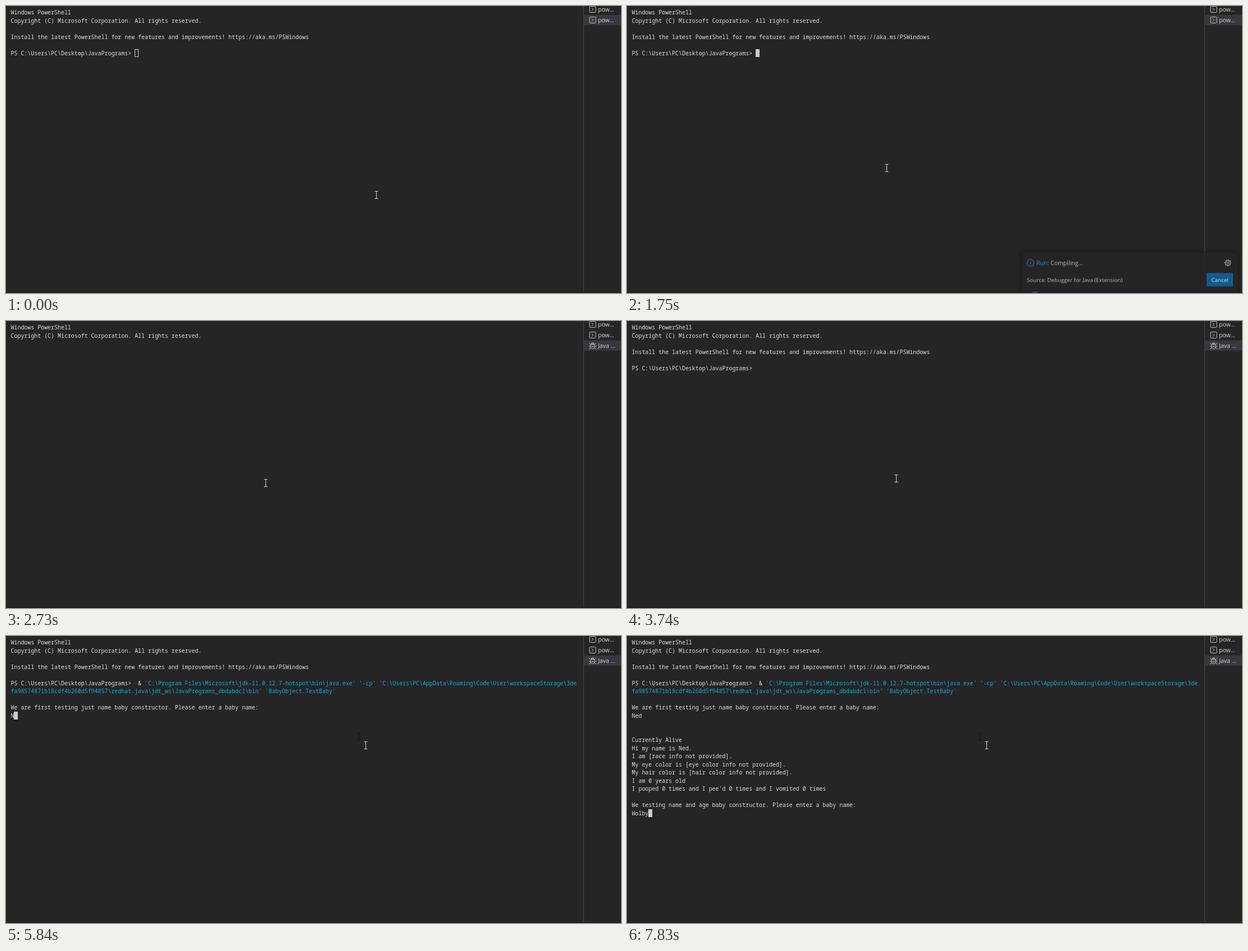
An HTML page for the animation above (8 s loop, 1095 by 512 pixels).

```html
<!DOCTYPE html>
<html lang="en">
<head>
<meta charset="utf-8">
<title>Terminal session</title>
<style>
  html, body { margin: 0; width: 100%; height: 100%; overflow: hidden; background: #252526; }
  .stage { position: relative; width: 1095px; height: 512px; overflow: hidden; }
  svg { position: absolute; inset: 0; }

  /* Every timeline is one 8 s loop that jumps between its keyframes. */
  .anim { animation: 8s step-end infinite; }

  .line, .typed {
    position: absolute; left: 8.5px; top: calc(4.25px + var(--row) * 14.5px);
    font: 500 9.957px/14.5px "Noto Sans Mono", monospace; color: #dedede; white-space: pre;
  }
  .path { color: #12acd4; }
  .typed { overflow: hidden; width: 0; }

  .title { animation-name: title; }
  .install { animation-name: install; }
  .prompt { animation-name: prompt; }
  .command { animation-name: command; }
  .question { animation-name: question; }
  .report { animation-name: report; }
  .java-tab { animation-name: java-tab; }
  .selection { animation-name: selection; }
  .first-name { animation-name: first-name; }
  .second-name { animation-name: second-name; }

  @keyframes title { 31.5% { visibility: hidden } 34.125% { visibility: visible } }
  @keyframes install { 31.5% { visibility: hidden } 36.75% { visibility: visible } }
  @keyframes prompt { 31.5% { visibility: hidden } 46.75% { visibility: visible } }
  @keyframes command { 0% { visibility: hidden } 48.5% { visibility: visible } }
  @keyframes question { 0% { visibility: hidden } 52% { visibility: visible } }
  @keyframes report { 0% { visibility: hidden } 81.375% { visibility: visible } }
  @keyframes java-tab { 0% { visibility: hidden } 31.5% { visibility: visible } }
  @keyframes selection { 31.5% { transform: translateY(18.7px) } }
  @keyframes first-name { 73% { width: 1ch } 75.5% { width: 2ch } 78.875% { width: 3ch } }
  @keyframes second-name {
    90.5% { width: 1ch } 93% { width: 2ch } 94.625% { width: 3ch }
    96.25% { width: 4ch } 97.875% { width: 5ch }
  }

  .caret {
    position: absolute; box-sizing: border-box; width: 7px; height: 14px;
    border: 1px solid #ccc; animation-name: caret;
  }
  @keyframes caret {
    0% { left: 229px; top: 77px; background: transparent }
    4.25% { left: 229px; top: 77px; background: #ccc }
    31.5% { left: 8px; top: 135px; background: #ccc; visibility: hidden }
    56.25% { left: 8px; top: 135px; background: #ccc; visibility: visible }
    73% { left: 14px; top: 135px; background: #ccc }
    75.5% { left: 20px; top: 135px; background: #ccc }
    78.875% { left: 26px; top: 135px; background: #ccc }
    81.375% { left: 8px; top: 309px; background: #ccc }
    90.5% { left: 14px; top: 309px; background: #ccc }
    93% { left: 20px; top: 309px; background: #ccc }
    94.625% { left: 26px; top: 309px; background: #ccc }
    96.25% { left: 32px; top: 309px; background: #ccc }
    97.875% { left: 38px; top: 309px; background: #ccc }
  }

  .mouse { animation-name: mouse; }
  @keyframes mouse {
    0% { transform: translate(659px, 337px) }
    .875% { transform: translate(610px, 325px) }
    1.75% { transform: translate(530px, 306px) }
    2.625% { transform: translate(462px, 289px) }
    46.75% { transform: translate(479px, 281px); animation-timing-function: steps(2) }
    48.5% { transform: translate(517px, 243px); animation-timing-function: steps(2) }
    50.25% { transform: translate(581px, 202px) }
    51.125% { transform: translate(628px, 179px) }
    52% { transform: translate(657px, 165px) }
    56.25% { transform: translate(655px, 170px); animation-timing-function: steps(4) }
    59.75%, 100% { transform: translate(640px, 195px) }
  }

  .ui { font: 10.55px "Open Sans", sans-serif; fill: #d4d4d4; }
  .small { font-size: 9.78px; }
  .icon { fill: none; stroke: #c5c5c5; }
  .info { fill: none; stroke: #3794ff; }
  .card { fill: #252526; filter: drop-shadow(0 0 4px rgba(0, 0, 0, .5)); }

  .toast { opacity: 0; animation-name: toast; }
  @keyframes toast {
    20.125% { opacity: .38; transform: translateY(44px) }
    21% { opacity: .667; transform: translateY(23.6px) }
    21.875% { opacity: .883; transform: translateY(8.3px) }
    22.75% { opacity: .995; transform: translateY(.3px) }
    23.625% { opacity: 1; transform: none }
    30.625% { opacity: 0; transform: none }
  }
  .progress { animation-name: progress; }
  @keyframes progress {
    0%, 20.125% { transform: translateX(712.8px) scaleX(1.06); animation-timing-function: steps(12) }
    30.625%, 100% { transform: translateX(793.4px) scaleX(1.9) }
  }
</style>
</head>
<body>
<div class="stage">
  <div class="line anim title" style="--row:0">Windows PowerShell
Copyright (C) Microsoft Corporation. All rights reserved.</div>
  <div class="line anim install" style="--row:3">Install the latest PowerShell for new features and improvements! https://aka.ms/PSWindows</div>
  <div class="line anim prompt" style="--row:5">PS C:\Users\PC\Desktop\JavaPrograms&gt;</div>
  <div class="line anim command" style="--row:5">                                      &amp; <span class="path">'C:\Program Files\Microsoft\jdk-11.0.12.7-hotspot\bin\java.exe' '-cp' 'C:\Users\PC\AppData\Roaming\Code\User\workspaceStorage\3de
fa98574871b18cdf4b260d5f94857\redhat.java\jdt_ws\JavaPrograms_dbdabdc1\bin' 'BabyObject.TestBaby'</span></div>
  <div class="line anim question" style="--row:8">We are first testing just name baby constructor. Please enter a baby name:</div>
  <div class="typed anim first-name" style="--row:9">Ned</div>
  <div class="line anim report" style="--row:12">Currently Alive
Hi my name is Ned.
I am [race info not provided].
My eye color is [eye color info not provided].
My hair color is [hair color info not provided].
I am 0 years old
I pooped 0 times and I pee'd 0 times and I vomited 0 times

We testing name and age baby constructor. Please enter a baby name:</div>
  <div class="typed anim second-name" style="--row:21">Wolby</div>
  <div class="caret anim"></div>

  <svg class="ui" width="1095" height="512">
    <defs>
      <g id="shell">
        <rect x="-5.5" y="-5.5" width="11" height="11" rx="1.5"/>
        <path d="M-2-3L1.2 0L-2 3"/>
      </g>
      <path id="beam" d="M-2.5-6.5H3.5M.5-6.5V6.5M-2.5 6.5H3.5"/>
    </defs>

    <path d="M1028.5 0V510" stroke="#444"/>
    <rect y="510" width="1095" height="2" fill="#1e1e1e"/>

    <rect class="anim selection" x="1029" y="15.8" width="66" height="18.5" fill="#37373d"/>
    <use class="icon" href="#shell" x="1044.5" y="6"/>
    <text x="1054" y="9.8">pow...</text>
    <use class="icon" href="#shell" x="1044.5" y="25"/>
    <text x="1054" y="28.8">pow...</text>
    <g class="anim java-tab">
      <g class="icon" transform="translate(1044.5 44)">
        <ellipse cy="1" rx="3.5" ry="4.5"/>
        <path d="M-2.5-2.5Q-2.5-5.5 0-5.5T2.5-2.5ZM-3.5 1H-6.5M3.5 1H6.5M-3-1L-5.5-3.5V-5M3-1L5.5-3.5V-5M-3 3.5L-5.5 5V6.5M3 3.5L5.5 5V6.5M-1.5 0L1.5 3M1.5 0L-1.5 3"/>
      </g>
      <text x="1054" y="47.8">Java ...</text>
    </g>

    <g class="anim toast">
      <rect class="card" x="703" y="432" width="384" height="71"/>
      <g class="info" transform="translate(718.5 450)">
        <circle r="6.2"/>
        <path d="M0-1V3.5M0-3.5V-2.3"/>
      </g>
      <text x="729" y="453.8"><tspan fill="#3794ff">Run</tspan>: Compiling...</text>
      <g class="icon" transform="translate(1070 450)">
        <circle r="5" stroke-width="2" stroke-dasharray="1.963" stroke-dashoffset=".98"/>
        <circle r="4.1"/>
        <circle r="1.7"/>
      </g>
      <text class="small" x="712" y="483.6">Source: Debugger for Java (Extension)</text>
      <rect x="1032" y="468" width="47" height="24" fill="#0e639c"/>
      <text class="small" x="1055.5" y="483.6" text-anchor="middle" fill="#fff">Cancel</text>
      <rect class="anim progress" x="-3.84" y="501.5" width="7.68" height="2" fill="#0e70c0"/>
    </g>

    <g class="anim question"><use href="#beam" x="628" y="179" fill="none" stroke="#171717"/></g>
    <g class="anim mouse"><use href="#beam" fill="none" stroke="#d8d8d8"/></g>
  </svg>
</div>
</body>
</html>
```
